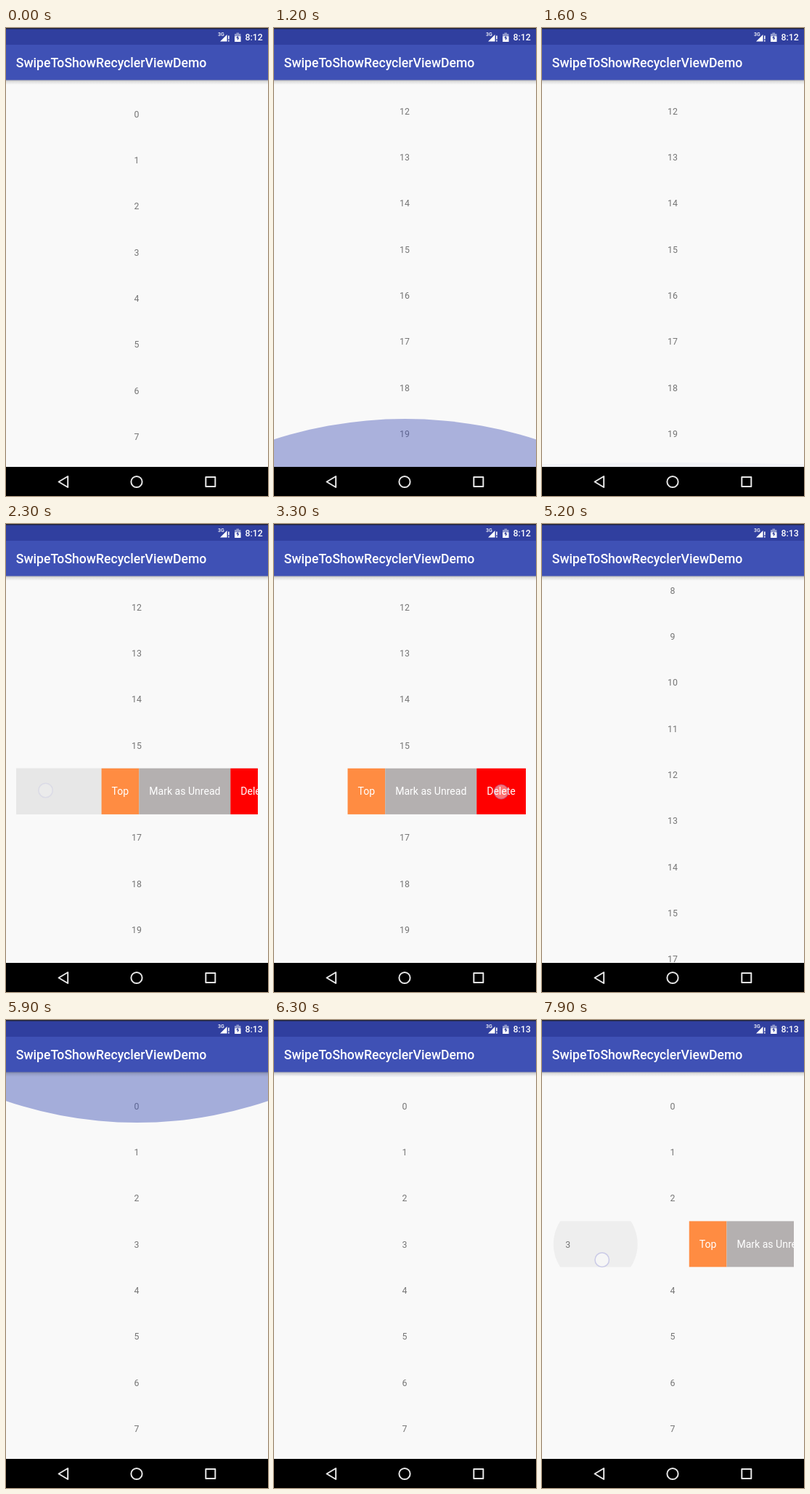
These frames come from a looping animation (361x643 px, 8 s). An HTML page:

```html
<!DOCTYPE html>
<html lang="en">
<head>
<meta charset="utf-8">
<style>
html, body { margin: 0; width: 100%; height: 100%; overflow: hidden; background: #f9f9f9; }
svg { display: block; }
text { font-family: Roboto, "Open Sans", sans-serif; }
#items text { font-size: 12.3px; fill: #757575; text-anchor: middle; }
#menu text { font-size: 14.05px; fill: #fff; }
.bar { fill: #fff; font-weight: 500; }
.nav { fill: none; stroke: #e6e6e6; stroke-width: 2; stroke-linejoin: round; }
</style>
</head>
<body>
<svg width="361" height="643" viewBox="0 0 361 643">
  <defs>
    <clipPath id="listClip"><rect x="14" y="71" width="333" height="532"/></clipPath>
    <clipPath id="glowClip"><rect y="71" width="361" height="532"/></clipPath>
    <linearGradient id="shade" x2="0" y2="1">
      <stop offset="0" stop-opacity=".3"/>
      <stop offset=".4" stop-opacity=".1"/>
      <stop offset="1" stop-opacity="0"/>
    </linearGradient>
  </defs>
  <rect width="361" height="643" fill="#f9f9f9"/>
  <g clip-path="url(#listClip)">
    <svg id="row" x="14" width="333" height="63.4" overflow="hidden">
      <g id="content">
        <circle id="ripple" cx="204" cy="31.7"/>
        <g id="menu" transform="translate(333 0)"></g>
      </g>
    </svg>
    <g id="items"></g>
  </g>
  <g clip-path="url(#glowClip)" fill="#3f51b5">
    <ellipse id="glowTop" cx="180.5"/>
    <ellipse id="glowBottom" cx="180.5"/>
  </g>
  <circle id="dot" r="9.7" fill="#fff" fill-opacity=".45" stroke="#8f8fd8" stroke-opacity=".38" stroke-width="1.5"/>

  <rect y="71" width="361" height="7" fill="url(#shade)"/>
  <rect width="361" height="23" fill="#303f9f"/>
  <rect width="361" height="1.5" fill="#24263a"/>
  <rect y="23" width="361" height="48.5" fill="#3f51b5"/>
  <text class="bar" x="13.8" y="54" font-size="17.64">SwipeToShowRecyclerViewDemo</text>
  <text class="bar" x="292" y="11.3" font-size="7">3G</text>
  <path d="M295 18.5L304.5 9V18.5Z" fill="#fff"/>
  <path d="M306 10.5h1.6v5h-1.6zM306 16.8h1.6v1.7h-1.6z" fill="#fff"/>
  <path d="M315 8h2.4V6.5h3.6V8h2.4v11H315z" fill="#8f98cc"/>
  <path d="M315 11.5h8.4V19H315z" fill="#fff"/>
  <path d="M319.8 10.2L317.2 14H318.9V17.2L321.4 13.2H319.8Z" fill="#303f9f"/>
  <text class="bar" id="clock" x="329.5" y="17.3" font-size="12.3"></text>

  <rect y="603" width="361" height="40"/>
  <path class="nav" d="M72.6 623.5L85.2 616V631Z"/>
  <circle class="nav" cx="180" cy="623.5" r="7.6"/>
  <rect class="nav" x="275.3" y="617" width="13" height="13"/>
</svg>
<script>
const LOOP = 8000, STEP = 100;
const PITCH = 63.36, FIRST = 118.2, COUNT = 20;
const MAX_SCROLL = 764.4, DRAG_BACK = 167.1;
const GONE = 16, ADDED = 11, MENU_WIDTH = 245.5, SWIPE_TIME = 300;
const $ = id => document.getElementById(id);
const phase = (t, start, duration) => Math.min(1, Math.max(0, (t - start) / duration));
const smooth = p => p * p * (3 - 2 * p);
const easeOut = p => 1 - (1 - p) ** 2;
const mix = (a, b, p) => a + (b - a) * p;

function set(el, attrs) {
  for (const name in attrs) el.setAttribute(name, attrs[name]);
}

function make(tag, parent, attrs = {}) {
  const el = document.createElementNS("http://www.w3.org/2000/svg", tag);
  set(el, attrs);
  return parent.appendChild(el);
}

const swipes = [
  { item: GONE, from: 2000, to: 3500, ease: 384, x: 270, y: 366, reach: 400, tint: .07, press: .4 },
  { item: 3, from: 7600, to: LOOP, ease: 537, x: 227, y: 329.5, reach: 58, tint: .045, press: 1 }
];
const strokes = [
  { at: 700, time: 200, from: [230, 412], to: [255, 90] },
  { at: 3300, time: 0, from: [313, 368], to: [313, 368] },
  { at: 4500, time: 300, from: [210, 150], to: [222, 262] },
  { at: 5600, time: 200, from: [245, 232], to: [208, 515] }
];

const labels = Array.from({ length: COUNT }, (_, i) => {
  const label = make("text", $("items"));
  label.textContent = i;
  return label;
});

let menuX = 0;
for (const [name, width, fill] of [["Top", 51.7, "#ff8c42"], ["Mark as Unread", 126, "#b4b0b0"], ["Delete", 68.5, "#ff0000"]]) {
  make("rect", $("menu"), { x: menuX, width, height: 63.4, fill });
  make("text", $("menu"), { x: menuX + 14, y: 36.8 }).textContent = name;
  menuX += width;
}

function drawList(t, scroll, removed, swipe, slide) {
  labels.forEach((label, i) => {
    const slot = i > GONE ? i - removed : i;
    let opacity = 1;
    if (i === GONE && removed) opacity = 0;
    if (i === ADDED && t >= 3400) opacity = phase(t, 3600, 200);
    set(label, {
      x: swipe && swipe.item === i ? 180 - slide : 180,
      y: FIRST + slot * PITCH - scroll + 4.4,
      opacity
    });
  });
}

function drawRow(t, scroll, swipe, slide) {
  $("row").style.display = swipe ? "" : "none";
  if (!swipe) return;
  const release = swipe.from + SWIPE_TIME;
  set($("row"), {
    y: FIRST + (swipe.item - .5) * PITCH - scroll - .4,
    opacity: swipe.item === GONE ? 1 - phase(t, 3300, 200) : 1
  });
  set($("content"), { transform: `translate(${-slide} 0)` });
  set($("ripple"), {
    r: swipe.reach * phase(t, swipe.from, SWIPE_TIME),
    opacity: swipe.tint * (1 - phase(t, release, 200))
  });
}

// Edge glow rises fast, then recedes over 600 ms.
function drawGlow(el, t, peak, edge, dir) {
  const power = t < peak ? phase(t, peak - 100, 100) : (1 - phase(t, peak, 600)) ** 2;
  set(el, { cy: edge - dir * 469 * power, rx: 541.5, ry: 541.5 * power, opacity: .47 * power });
}

function drawTouch(t, swipe, slide) {
  const stroke = strokes.find(s => t >= s.at && t < s.at + s.time + STEP);
  if (stroke) {
    const p = stroke.time ? phase(t, stroke.at, stroke.time) : 0;
    const [cx, cy] = stroke.from.map((v, i) => mix(v, stroke.to[i], p));
    set($("dot"), { cx, cy, opacity: 1 });
  } else if (swipe && t <= swipe.from + SWIPE_TIME) {
    const opacity = mix(1, swipe.press, phase(t, swipe.from, SWIPE_TIME));
    set($("dot"), { cx: swipe.x - slide, cy: swipe.y, opacity });
  } else {
    set($("dot"), { opacity: 0 });
  }
}

function draw(t) {
  const removed = smooth(phase(t, 3450, 250));
  const scroll = MAX_SCROLL * phase(t, 700, 415) ** 1.2
    - PITCH * removed
    - DRAG_BACK * easeOut(phase(t, 4500, 700))
    - (MAX_SCROLL - PITCH - DRAG_BACK) * phase(t, 5600, 270) ** 1.3;
  const swipe = swipes.find(s => t >= s.from && t < s.to);
  const slide = swipe ? MENU_WIDTH * smooth(phase(t, swipe.from, swipe.ease)) : 0;

  drawList(t, scroll, removed, swipe, slide);
  drawRow(t, scroll, swipe, slide);
  drawGlow($("glowBottom"), t, 1172, 603, -1);
  drawGlow($("glowTop"), t, 5890, 71, 1);
  drawTouch(t, swipe, slide);
  $("clock").textContent = t < 4900 ? "8:12" : "8:13";
}

const start = performance.now();
function tick() {
  const t = (performance.now() - start) % LOOP;
  draw(Math.floor(t / STEP) * STEP);
  requestAnimationFrame(tick);
}
tick();
</script>
</body>
</html>
```
